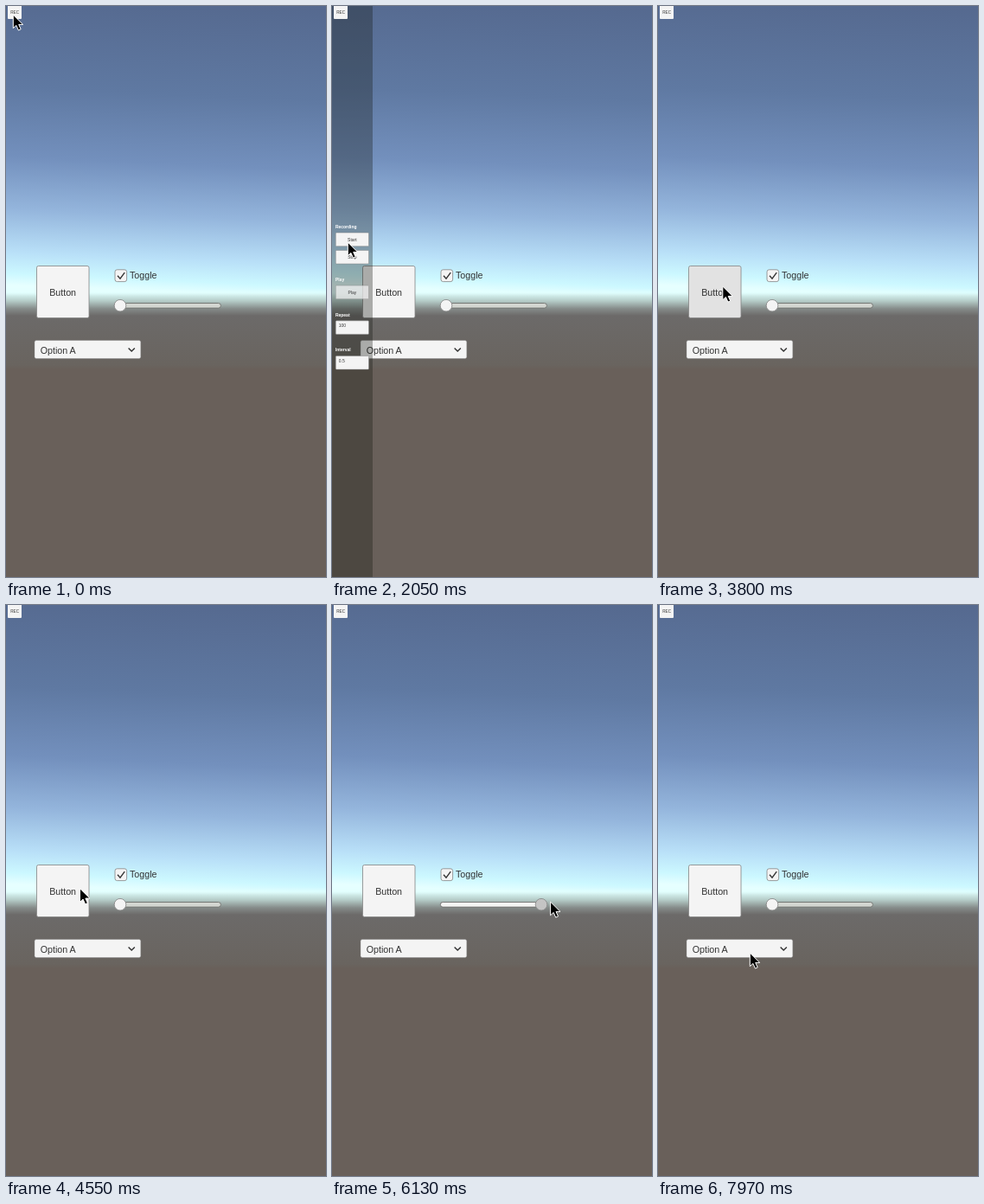
An HTML page for the animation above (8000 ms loop, 370 px wide and 660 px high).

```html
<!DOCTYPE html>
<html lang="en">
<head>
<meta charset="utf-8">
<title>UI demo</title>
<style>
  html, body { margin: 0; width: 100%; height: 100%; overflow: hidden; }
  body { background: #69605a; position: relative; }
  #sky, #horizon, svg { position: absolute; left: 0; top: 0; width: 370px; height: 660px; }
  #sky {
    background: linear-gradient(182.5deg, #55698f, #5f79a2 110px, #7390bd 190px,
      #94b5dc 250px, #b9e0f8 300px, #ccf8ff 325px, #e6ffff 338px);
  }
  #horizon {
    background: linear-gradient(#e0fffd 331px, #b4cbc7 341px, #858b89 350px, #6c6a69 358px,
      #69645f 415px, #69605a 420px);
    -webkit-mask-image: linear-gradient(transparent 326px, #000 335px);
    mask-image: linear-gradient(transparent 326px, #000 335px);
  }
  text { font-family: "Liberation Sans", Arial, sans-serif; font-size: 10.7px; fill: #323232; }
  .box { fill: #f4f4f4; stroke: #858585; stroke-width: .8; }
  .mid { text-anchor: middle; }
  #panel text { font-size: 5px; }
  #panel .label { font-weight: bold; fill: #fff; }
  #panel .box { stroke-width: .5; }
</style>
</head>
<body>
<div id="sky"></div>
<div id="horizon"></div>
<svg viewBox="0 0 370 660">
  <rect id="button" class="box" x="35.5" y="300.5" width="60.5" height="60" rx="2"/>
  <text class="mid" x="65.6" y="334.7">Button</text>

  <rect class="box" x="126" y="304.8" width="13.6" height="13.8" rx="2.5"/>
  <path d="M129 311.8l3 3.4 5.2-7" fill="none" stroke="#323232" stroke-width="1.4"/>
  <text x="143" y="315.4">Toggle</text>

  <rect x="125.4" y="343.5" width="123" height="5.6" rx="2.8" fill="#d3d6d1" stroke="#6f716e" stroke-width=".9"/>
  <rect id="fill" x="125.4" y="343.5" height="5.6" rx="2.8" fill="#f5f5f3" stroke="#777" stroke-width=".9"/>
  <circle id="handle" class="box" cy="346.2" r="6.8"/>

  <rect class="box" x="33" y="386.5" width="122.8" height="21" rx="2" style="stroke-width:.4"/>
  <text x="39.7" y="401.5">Option A</text>
  <path d="M141.6 395.4l3.6 3.7 3.6-3.7" fill="none" stroke="#323232" stroke-width="1.4"/>

  <g id="panel">
    <rect width="47" height="660" fill="#141610" fill-opacity=".33"/>
  </g>

  <rect id="rec" x="2" y="-1" width="16" height="16" rx="1"/>
  <text class="mid" x="10.1" y="8.8" style="font-size:4.7px">REC</text>

  <path id="cursor" d="M0 .3V15.9L3.6 12.6 6.1 18.3 8.9 17.1 6.4 11.6H11.4Z" stroke="#fff" stroke-width="1"/>
</svg>
<script>
const LOOP = 8000, FRAME = 57;
const $ = id => document.getElementById(id);
const clamp = (value, low = 0, high = 1) => Math.min(high, Math.max(low, value));
const ease = k => k < .5 ? 4 * k ** 3 : 1 - 4 * (1 - k) ** 3;

function add(tag, attributes, content = '') {
  const node = document.createElementNS('http://www.w3.org/2000/svg', tag);
  for (const name in attributes) node.setAttribute(name, attributes[name]);
  node.textContent = content;
  $('panel').append(node);
}

const rows = ['label Recording', 'button Start', 'button Stop', 'label Play', 'button Play',
  'label Repeat', 'field 100', 'label Interval', 'field 0.5'];
rows.forEach((row, i) => {
  const [kind, text] = row.split(' ');
  const y = 241.7 + 20.35 * i;
  if (kind === 'label') return add('text', { class: kind, x: 3.9, y: y + 15.1 }, text);
  const opacity = text === 'Play' ? .72 : 1;
  add('rect', { class: 'box', x: 4.3, y, width: 38.2, height: 15.6, rx: 1, opacity });
  if (kind === 'button') add('text', { class: 'mid', x: 23.4, y: y + 9.5 }, text);
  else add('text', { x: 7.8, y: y + 7.4 }, text);
});

// Cursor moves in order; bulge bends a move sideways.
const moves = [
  { from: 1185, to: 1190, x: 11, y: 14 },
  { from: 1190, to: 1870, x: 18, y: 272, bulge: 70 },
  { from: 2040, to: 2340, x: 20, y: 265 },
  { from: 2560, to: 3210, x: 71, y: 323 },
  { from: 3560, to: 3620, x: 74.5, y: 323 },
  { from: 4380, to: 4850, x: 130, y: 342 },
  { from: 5110, to: 5730, x: 254, y: 342 },
  { from: 5960, to: 7130, x: 118, y: 343 },
  { from: 7340, to: 7790, x: 98, y: 401 },
  { from: 7960, to: 7970, x: 106, y: 401 }
];
function cursorAt(t) {
  let x = 8, y = 9;
  for (const move of moves) {
    const k = ease(clamp((t - move.from) / (move.to - move.from)));
    x += (move.x - x) * k + (move.bulge || 0) * Math.sin(Math.PI * k);
    y += (move.y - y) * k;
  }
  return [x, y];
}

// Darkens quickly while held, then fades out after release.
const pressed = (t, down, up) =>
  t < down ? 0 : t < up ? clamp(.5 + (t - down) / 100) : .37 * clamp(1 - (t - up) / 110);
function tint(id, level) {
  const grey = Math.round(244 - 48 * level);
  $(id).style.fill = `rgb(${grey},${grey},${grey})`;
}

function draw(t) {
  const [x, y] = cursorAt(t);
  $('cursor').setAttribute('transform', `translate(${x + .3} ${y + .8})`);
  $('panel').style.display = t >= 1190 && t < 2520 ? '' : 'none';
  tint('rec', pressed(t, 960, 1190));
  tint('button', pressed(t, 3570, 3800) + pressed(t, 4140, 4380));
  tint('handle', pressed(t, 5090, 7340));

  // The handle trails the cursor by one update while dragged.
  const dragged = t >= 5090 && t < 7340;
  const handleX = dragged ? clamp(cursorAt(t - FRAME)[0] + 2, 132, 242) : 132;
  $('handle').setAttribute('cx', handleX);
  $('fill').setAttribute('width', handleX - 125.4);
}

const start = performance.now();
function tick() {
  draw((performance.now() - start) % LOOP);
  requestAnimationFrame(tick);
}
tick();
</script>
</body>
</html>
```
